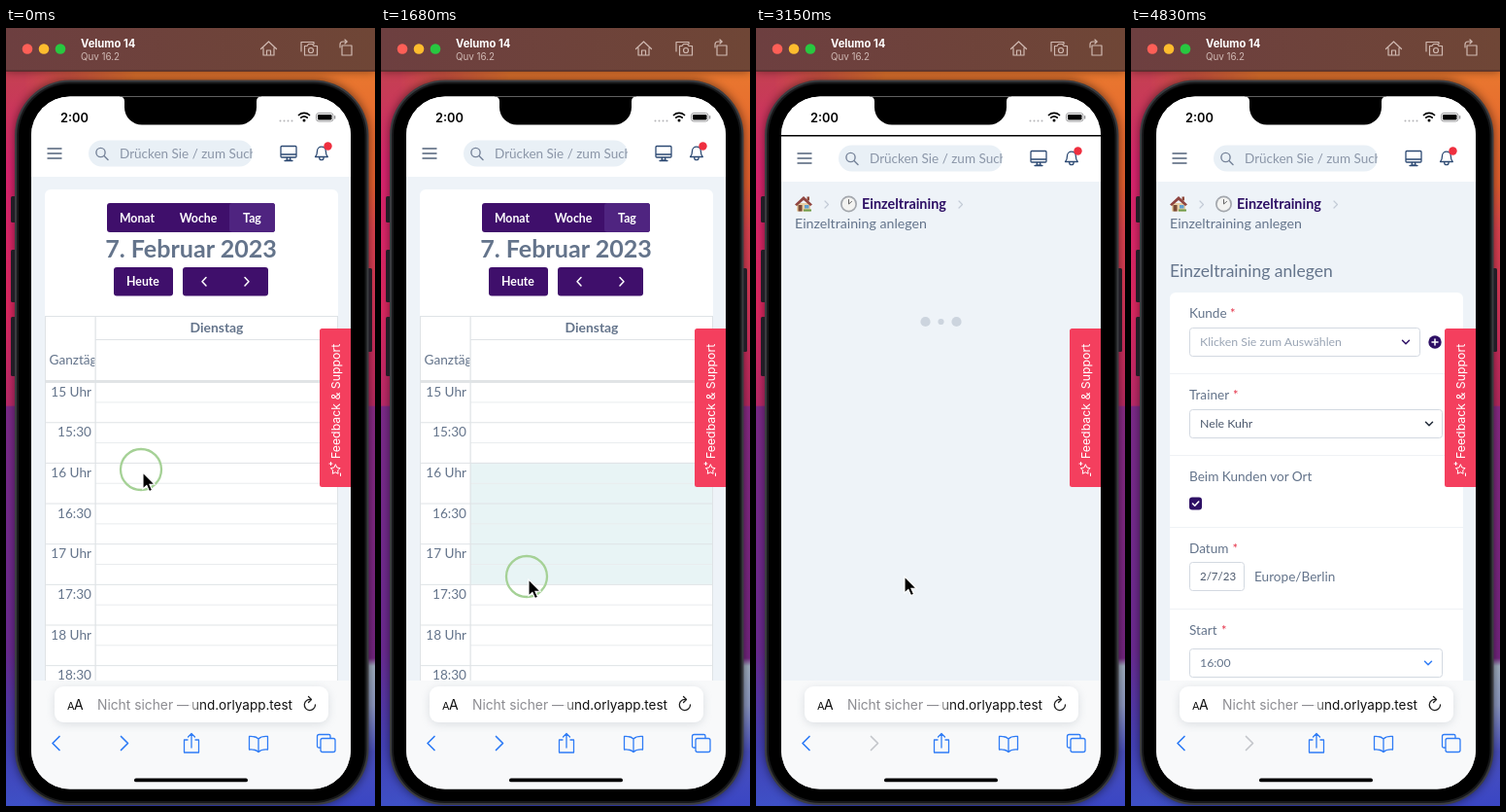
An HTML page for the animation above (4.9 s loop, 380 by 800 pixels).

```html
<!DOCTYPE html>
<html lang="de">
<head>
<meta charset="utf-8">
<title>Kalender</title>
<style>
  html, body { margin: 0; width: 100%; height: 100%; overflow: hidden; background: #000; }
  svg { display: block; }
  text { font-family: Lato, "Open Sans", sans-serif; white-space: pre; }
  .ui { font-family: Inter, Roboto, sans-serif; }
  .b { font-weight: 700; }
  .line { fill: none; stroke-linecap: round; stroke-linejoin: round; }
</style>
</head>
<body>
<svg id="stage" width="380" height="800" viewBox="0 0 380 800">
  <defs>
    <linearGradient id="wallL" x2="0" y2="1">
      <stop stop-color="#c04a48"/><stop offset=".09" stop-color="#c83a58"/>
      <stop offset=".18" stop-color="#d8246e"/><stop offset=".36" stop-color="#dc2860"/>
      <stop offset=".485" stop-color="#b92a68"/><stop offset=".487" stop-color="#7b2a88"/>
      <stop offset=".8" stop-color="#6a2a90"/><stop offset=".92" stop-color="#4340b4"/>
      <stop offset="1" stop-color="#3e50c6"/>
    </linearGradient>
    <linearGradient id="wallR" x2="0" y2="1">
      <stop offset=".05" stop-color="#e9782f"/><stop offset=".2" stop-color="#e4602f"/>
      <stop offset=".26" stop-color="#df4450"/><stop offset=".4" stop-color="#cf2f5c"/>
      <stop offset=".485" stop-color="#b92a60"/><stop offset=".487" stop-color="#8a2b86"/>
      <stop offset=".81" stop-color="#762682"/><stop offset=".82" stop-color="#a3b1c2"/>
      <stop offset=".87" stop-color="#8f9bc4"/><stop offset=".93" stop-color="#4a50bd"/>
      <stop offset="1" stop-color="#3a46c4"/>
    </linearGradient>
    <linearGradient id="across" x2="1">
      <stop offset=".05" stop-color="#fff"/><stop offset=".35" stop-color="#000"/>
    </linearGradient>
    <mask id="left"><rect width="380" height="800" fill="url(#across)"/></mask>
    <linearGradient id="bar" x2="1">
      <stop stop-color="#6d3f40"/><stop offset="1" stop-color="#6f4636"/>
    </linearGradient>
    <linearGradient id="fade" x2="1">
      <stop stop-color="#fff" stop-opacity=".8"/><stop offset="1" stop-color="#fff" stop-opacity="0"/>
    </linearGradient>
    <filter id="soft" x="-20%" y="-50%" width="140%" height="200%"><feGaussianBlur stdDeviation="5"/></filter>
    <clipPath id="screen"><rect x="26" y="70.500" width="329" height="712" rx="40"/></clipPath>
    <clipPath id="searchClip"><rect x="85" y="110" width="169" height="40"/></clipPath>
    <clipPath id="axisClip"><rect x="40" y="322" width="51.5" height="40"/></clipPath>
  </defs>
</svg>
<script>
const LOOP = 4900, STEP = 70;
const SLATE = '#64748b', PURPLE = '#3f0f6b', INK = '#2e1065', BLUE = '#2f7cf6';
const stage = document.getElementById('stage');

// markup helpers
const text = (x, y, s, size, fill = SLATE, attrs = '') =>
  `<text x="${x}" y="${y}" font-size="${size}" fill="${fill}" ${attrs}>${s.replace('&', '&amp;')}</text>`;
const rect = (x, y, w, h, fill, rx = 0, attrs = '') =>
  `<rect x="${x}" y="${y}" width="${w}" height="${h}" rx="${rx}" fill="${fill}" ${attrs}/>`;
const line = (d, stroke, width = 1.5, attrs = '') =>
  `<path class="line" d="${d}" stroke="${stroke}" stroke-width="${width}" ${attrs}/>`;
const dot = (x, y, r, fill, attrs = '') => `<circle cx="${x}" cy="${y}" r="${r}" fill="${fill}" ${attrs}/>`;
const group = (id, body, attrs = '') => `<g id="${id}" ${attrs}>${body}</g>`;
const chevron = (x, y, w, h, color, width) => line(`M${x} ${y}l${w} ${h}l${-w} ${h}`, color, width);
const down = (x, y, color) => line(`M${x - 3.5} ${y - 1.7}l3.5 3.5l3.5-3.5`, color, 1.5);
const mid = 'text-anchor="middle"';

function desktop() {
  const icon = '#d0b9b1';
  return rect(0, 0, 380, 800, 'url(#wallR)') + rect(0, 0, 380, 800, 'url(#wallL)', 0, 'mask="url(#left)"') +
    rect(9, 53, 365, 746, '#000', 57, 'opacity=".5" filter="url(#soft)"') +
    rect(0, 0, 380, 45, '#000', 0, 'opacity=".4" filter="url(#soft)"') +
    rect(0, 0, 380, 44, 'url(#bar)') + rect(0, 43.5, 380, 1.2, '#4a2a29') +
    dot(22, 21.5, 5.3, '#fe5f57') + dot(39, 21.5, 5.3, '#febc2e') + dot(56, 21.5, 5.3, '#28c840') +
    text(77, 20, 'Velumo 14', 11.2, '#fff', 'class="ui b"') +
    text(77, 33, 'Quv 16.2', 9.8, '#d0bab5', 'class="ui"') +
    line('M262.5 21.5l8-7.5 8 7.5M265 20.5v7.5h11v-7.5M268.5 28v-5h4v5', icon, 1.2) +
    line('M304 24v-9.5h13v2M307.500 18.500h2.500l1.500-2h4l1.500 2h3.500v9.500h-13z', icon, 1.2) +
    `<circle cx="314" cy="23" r="2.500" fill="none" stroke="${icon}" stroke-width="1.200"/>` +
    line('M346 18h10v10h-10zM344 20v-3q0-3 3-3h4M349 12l2.200 2-2.200 2', icon, 1.2);
}

function body() {
  const key = (x, y, h) => rect(x, y, 5, h, '#211d26', 1.5);
  return key(5, 173, 27) + key(5, 228, 54) + key(5, 297, 61) + key(372, 247, 86) +
    rect(9, 53.5, 364.5, 745.5, '#3b3c40', 57) + rect(11, 55.5, 360.5, 741.5, '#17181a', 55) +
    rect(13, 57.5, 356.5, 737.5, '#000', 53);
}

function header() {
  const navy = '#2d4a73';
  return rect(26, 65, 329, 88, '#fff') +
    line('M43 124h14M43 129h14M43 134h14', '#52617a', 1.4) +
    rect(85, 115.5, 169, 27, '#e9f0f6', 13.5) +
    `<circle cx="97.500" cy="128" r="4.600" fill="none" stroke="#77849a" stroke-width="1.400"/>` +
    line('M101 131.500l4 4', '#77849a', 1.5) +
    group('', text(117, 134, 'Drücken Sie / zum Suchen', 13.5, '#8b96a8'), 'clip-path="url(#searchClip)"') +
    line('M284 121.500h14q1 0 1 1v9.500q0 1-1 1h-14q-1 0-1-1v-9.500q0-1 1-1zM283.500 130h15M289.500 133.500l-.5 2.500h4l-.5-2.500M287 136.500h8', navy, 1.3) +
    line('M318.500 132.500q2-2 2-6a4.400 4.400 0 0 1 8.800 0q0 4 2 6zM322.700 133.500a2.200 2.200 0 0 0 4.400 0', navy, 1.3) +
    dot(331.5, 121.5, 4.2, '#ef2f3f');
}

function calendar() {
  const cell = '#dfe3e6', top = 363.6, pitch = 41.65, white = '#fff';
  const h = (y, x = 40, color = cell) => rect(x, y, 342 - x, 1, color);
  let s = rect(26, 153, 329, 530, '#eef3f8') + rect(40, 166, 302, 530, white, 6) +
    rect(104, 180, 173, 30, PURPLE, 3) + rect(230, 180, 47, 30, '#4f2480', 3) +
    text(135, 199.500, 'Monat', 12.3, white, `class="b" ${mid}`) +
    text(198, 199.500, 'Woche', 12.3, white, `class="b" ${mid}`) +
    text(253.5, 199.500, 'Tag', 12.3, white, `class="b" ${mid}`) +
    text(190.5, 236, '7. Februar 2023', 25.1, SLATE, `class="b" ${mid}`) +
    rect(111, 246, 61, 29.5, PURPLE, 3) + rect(182, 246, 88, 29.5, PURPLE, 3) +
    text(141, 265, 'Heute', 12.3, white, `class="b" ${mid}`) +
    chevron(206, 256.500, -4, 4.2, white, 1.5) + chevron(246, 256.500, 4, 4.2, white, 1.5) +
    h(296) + h(320, 92) + text(217, 313, 'Dienstag', 13.9, SLATE, `class="b" ${mid}`) +
    group('', text(44.5, 346, 'Ganztägig', 13.6), 'clip-path="url(#axisClip)"') +
    rect(40, 362, 302, 3, '#e1e4e6') +
    rect(92, 446.900, 250, 0, '#e8f4f5', 0, 'id="pick"');
  for (let i = 0; i < 8; i++) {
    const y = top + pitch * i, hour = 15 + (i >> 1);
    s += (i ? h(y) : '') + h(y + pitch / 2, 92, '#e9ecee') +
      text(88, y + 15, hour + (i % 2 ? ':30' : ' Uhr'), 13.6, SLATE, 'text-anchor="end"');
  }
  return s + rect(40, 296, 1, 400, cell) + rect(91.5, 296, 1.2, 400, cell) + rect(341, 296, 1, 400, cell);
}

function crumbs() {
  const house = '<path d="M42 180h14v8.500h-14z" fill="#e8cfa6"/><path d="M40 181.500l9-8.500 9 8.500-2 1.500-7-6-7 6z" fill="#8f4440"/>' +
    rect(52.5, 173.500, 2.5, 4, '#8f4a3c') + rect(43.5, 182, 4, 6.5, '#7a4a35') + rect(50, 182, 4.500, 3.5, '#5f9fd0') +
    rect(49, 186.500, 8, 2, '#6f9b48');
  return rect(26, 153, 329, 530, '#eef3f8') + house +
    chevron(71, 178, 3.500, 3.500, '#c3cbd6', 1.2) + chevron(209, 178, 3.500, 3.500, '#c3cbd6', 1.2) +
    dot(95.5, 181, 8.500, '#a3a7ad') + dot(95.5, 181, 6.800, '#f3f3f1') +
    line('M95.500 176.500v4.500l3-2.500', '#666', 1) +
    text(109, 186, 'Einzeltraining', 14.4, INK, 'class="b"') +
    text(40, 206, 'Einzeltraining anlegen', 14.2);
}

function form() {
  const edge = '#d3d9e1', dark = '#4b586c';
  const label = (y, s, starX) => text(60, y, s, 13.6) + (starX ? text(starX, y, '*', 13, '#e5344a') : '');
  const field = (y, w, s, color = dark, size = 12.3) =>
    rect(60.5, y + .5, w - 1, 29, '#fff', 3, `stroke="${edge}"`) + text(71, y + 19, s, size, color);
  const rule = y => rect(40, y, 302, 1, '#eff2f5');
  return text(40, 256, 'Einzeltraining anlegen', 17.5) + rect(40, 272, 302, 420, '#fff', 6) +
    label(298, 'Kunde', 102) + field(308, 238, 'Klicken Sie zum Auswählen', '#9aa5b5') + down(283, 323, INK) +
    dot(313, 323, 6.7, INK) + line('M310 323h6M313 320v6', '#fff', 1.5) + rule(355) +
    label(382, 'Trainer', 105) + field(392, 261, 'Nele Kuhr') + down(307, 407, '#1f2937') + rule(439) +
    label(466, 'Beim Kunden vor Ort') + rect(60, 482.500, 13, 13, INK, 3) +
    line('M63.500 489l2.200 2.200 4-4.200', '#fff', 1.6) + rule(513) +
    label(540, 'Datum', 104.5) + field(549, 57, '2/7/23', dark, 11.5) + text(127, 568.500, 'Europe/Berlin', 13.6) + rule(597) +
    label(624, 'Start', 93) + field(638, 261, '16:00', SLATE) + down(306, 653, BLUE);
}

function tab() {
  return rect(323, 309, 36, 163, '#f43f5e', 2.5) +
    text(0, 0, 'Feedback & Support', 12.3, '#fff', 'class="ui" transform="translate(344 443) rotate(-90)"') +
    line('M339.500 449l1.300 3 3.200.600-2.300 2.400.4 3.300-2.900-1.500-2.900 1.500.4-3.300-2.300-2.400 3.200-.600zM334.500 446.500v3M333 448h3M344.500 458v2.500', '#fff', 1);
}

function chrome() {
  return rect(26, 671, 329, 115, '#f8f9fa') + rect(50, 679, 282, 37, '#8d97a3', 10, 'opacity=".28" filter="url(#soft)"') +
    rect(50, 677, 282, 37, '#fff', 9) +
    text(63, 701, 'A', 11, '#111', 'class="ui"') + text(70, 701, 'A', 14, '#111', 'class="ui"') +
    text(94, 701, 'Nicht sicher —', 13.8, '#8d8d92', 'class="ui"') +
    text(295, 701, 'und.orlyapp.test', 13.5, '#111', 'class="ui" text-anchor="end"') +
    rect(188, 685, 15, 24, 'url(#fade)') +
    line('M314 690.500a5.600 5.600 0 1 0 4.500 5.500M311.500 687.500l3 3-3 3', '#222', 1.3) +
    chevron(55, 728.500, -7, 7, BLUE, 1.7) +
    line('M118.500 728.500l7 7l-7 7', BLUE, 1.7, 'id="fwd"') +
    line('M187 732h-3.500v13h15v-13h-3.500M191 740v-14M187.500 729l3.500-3.500 3.500 3.500', BLUE, 1.3) +
    line('M260 731q-3-3-9.500-2.500v13.500q6.500-.500 9.500 2.500q3-3 9.500-2.500v-13.500q-6.500-.500-9.500 2.500v13', BLUE, 1.3) +
    line('M323 740h-1q-1.500 0-1.500-1.500v-10q0-2 2-2h10q1.500 0 1.500 1.500v2M326 730.500h11q2 0 2 2v10q0 2-2 2h-11q-2 0-2-2v-10q0-2 2-2z', BLUE, 1.3) +
    rect(132, 771.500, 117, 3.800, '#000', 1.9);
}

function status() {
  let s = text(56, 96.5, '2:00', 12.8, '#000', 'class="ui" font-weight="600"');
  for (let i = 0; i < 4; i++) s += dot(282.500 + i * 4, 95.500, 1, '#b5b5b8');
  return s + line('M301.500 89.500a8 8 0 0 1 11 0M303.800 92.200a4.800 4.800 0 0 1 6.400 0', '#000', 1.7) + dot(307, 95, 1.5, '#000') +
    rect(319.500, 87.500, 17.500, 8.500, 'none', 2.600, 'stroke="#9a9a9c"') + rect(321, 89, 14.500, 5.500, '#000', 1.3) +
    rect(338, 90, 1.3, 3.500, '#9a9a9c', .6) +
    '<path d="M117 69v1.500q5 0 5 5v6a18 18 0 0 0 18 18h100a18 18 0 0 0 18-18v-6q0-5 5-5v-1.500z"/>';
}

const dots = [174.5, 190.5, 206.5].map(x => dot(x, 302, 5, '#ccd4de')).join('');
stage.insertAdjacentHTML('beforeend', desktop() + body() +
  group('', rect(26, 70, 329, 713, '#fff') + group('cal', calendar()) +
    group('page', crumbs() + group('wait', dots) + group('form', form())) +
    group('head', header()) + rect(26, 110, 0, 1.5, '#000', 0, 'id="load"') +
    tab() + chrome() + status(), 'clip-path="url(#screen)"') +
  '<circle id="ring" r="21" fill="none" stroke="#a5d196" stroke-width="2.300"/>' +
  group('cursor', '<path d="M0 0v17l3.900-3.600 2.700 6.200 3-1.300-2.700-6h5.300z" fill="#000" stroke="#fff" stroke-width="1.100"/>'));

const el = {};
for (const id of ['cal', 'page', 'wait', 'form', 'head', 'load', 'ring', 'cursor', 'pick', 'fwd'])
  el[id] = document.getElementById(id);
const show = (node, on) => node.setAttribute('visibility', on ? 'inherit' : 'hidden');
const set = (node, attrs) => { for (const k in attrs) node.setAttribute(k, attrs[k]); };

// linear track through [time, ...values]
function track(keys, t) {
  let i = 0;
  while (i < keys.length - 2 && t >= keys[i + 1][0]) i++;
  const [a, b] = [keys[i], keys[i + 1]];
  const p = Math.min(1, Math.max(0, (t - a[0]) / (b[0] - a[0])));
  return a.slice(1).map((v, k) => v + (b[k + 1] - v) * p);
}

const pointer = [[0, 141, 457], [560, 141, 457], [1190, 147, 523], [1680, 152, 567], [2870, 152, 567], [3150, 153, 564], [3920, 153, 563]];
const progress = [[2800, 0], [2870, 26], [3010, 90], [3150, 329]];
const PRESS = 490, RELEASE = 2030, SWAP = 3080, READY = 3430, HIDE = 4410;

function draw(now) {
  const t = Math.floor((now % LOOP) / STEP) * STEP;
  const [x, y] = track(pointer, t), slot = 41.65 / 2, opened = t >= SWAP;

  show(el.cal, !opened);
  show(el.page, opened);
  show(el.wait, opened && t < READY);
  show(el.form, t >= READY);
  set(el.head, { transform: `translate(0 ${opened ? 5 : 0})` });
  set(el.fwd, { stroke: opened ? '#c4c7cb' : BLUE });

  set(el.pick, { height: t < PRESS ? 0 : Math.ceil((y - 446.9) / slot) * slot });
  set(el.cursor, { transform: `translate(${x} ${y})` });
  show(el.cursor, t < HIDE);
  set(el.ring, { cx: x - 2, cy: y - 3 });
  show(el.ring, t < RELEASE);

  set(el.load, { width: track(progress, t)[0], opacity: track([[3150, 1], [3360, 0]], t)[0] });
  const pulse = Math.cos((t - 3150) / 800 * 2 * Math.PI);
  [...el.wait.children].forEach((c, i) => set(c, { r: 4.1 + (i === 1 ? -1 : 1) * pulse }));
}

const start = performance.now();
(function tick() {
  draw(performance.now() - start);
  requestAnimationFrame(tick);
})();
</script>
</body>
</html>
```
